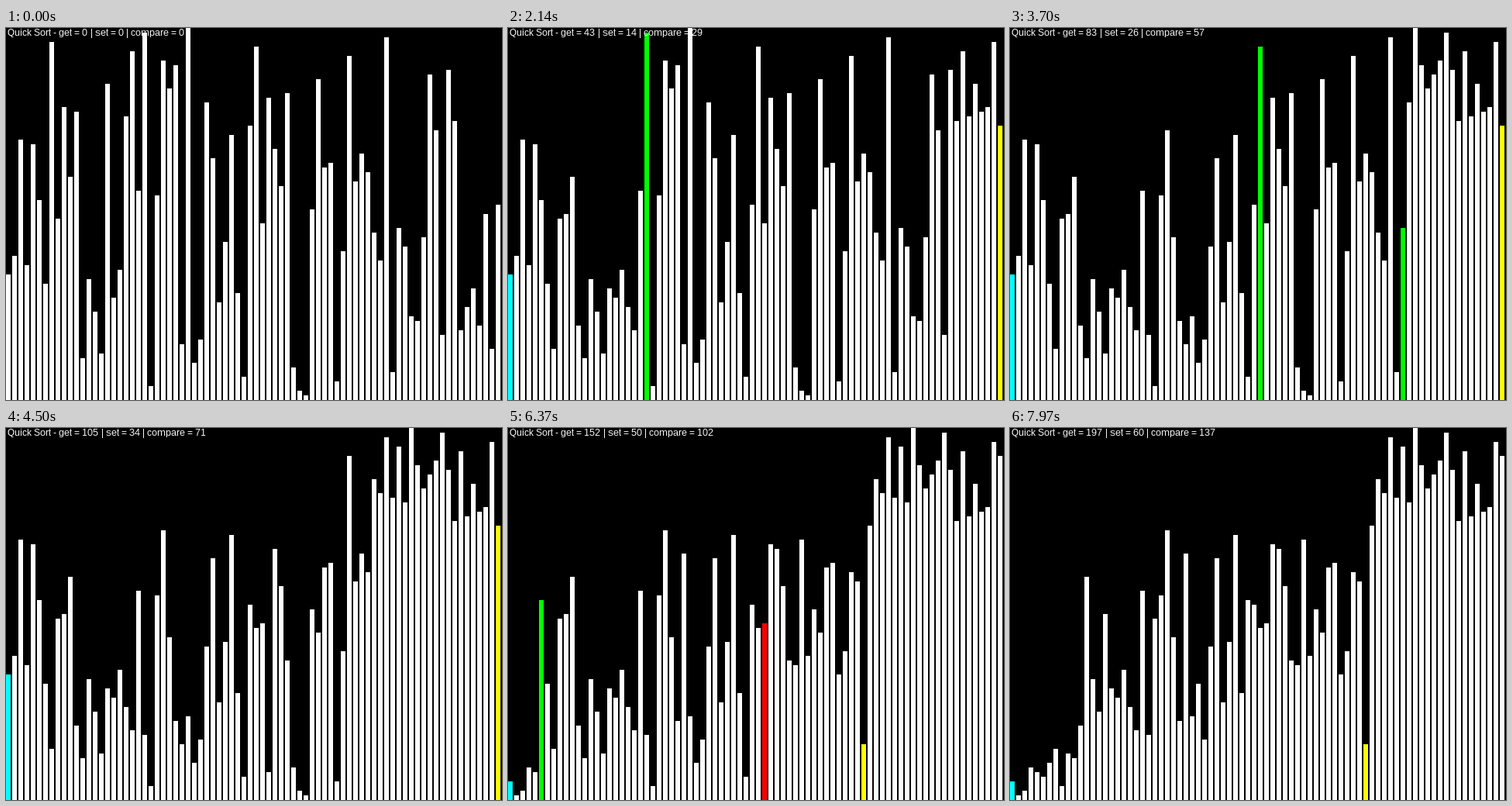
A matplotlib script that plays this animation: 640 px wide and 480 px high, repeating every 8 s.

```python
import matplotlib.pyplot as plt
import numpy as np
from matplotlib.animation import FuncAnimation
from matplotlib.collections import PolyCollection

W, H = 640, 480
PITCH, BAR, UNIT = 8, 6, 6
TICK, LOOP, HOLD = 10, 8000, 500      # ms
RATE = 30                             # sort steps per second
WHITE, RED, GREEN = "#ffffff", "#ff0000", "#00ff00"
CYAN, YELLOW = "#00ffff", "#ffff00"

VALUES = [
    27, 31, 56, 29, 55, 43, 25, 77, 39, 63, 48, 62, 9, 26, 19, 10,
    68, 22, 28, 61, 75, 45, 79, 3, 44, 73, 67, 72, 12, 80, 8, 13,
    64, 52, 21, 34, 57, 23, 5, 59, 76, 38, 65, 54, 46, 66, 7, 2,
    1, 41, 69, 50, 51, 4, 32, 74, 47, 53, 49, 36, 30, 78, 6, 37,
    33, 18, 17, 35, 70, 58, 14, 71, 60, 15, 20, 24, 16, 40, 11, 42,
]


class Sorter:
    """Quick sort that records every visible step."""

    def __init__(self, values):
        self.a = list(values)
        self.gets = self.sets = self.compares = 0
        self.bounds, self.marks = {}, {}
        self.steps = []
        self.record()
        self.sort(0, len(self.a) - 1)

    def record(self):
        colors = [WHITE] * len(self.a)
        for i, color in {**self.bounds, **self.marks}.items():
            colors[i] = color
        counts = (self.gets, self.sets, self.compares)
        self.steps.append((self.a[:], colors, counts))

    def swap(self, i, j):
        self.a[i], self.a[j] = self.a[j], self.a[i]
        self.gets += 2
        self.sets += 2
        self.marks = {}
        self.record()

    def scan(self, i, step, end, passes):
        """Walk a red mark until a value fails the test, then turn it green."""
        while i != end:
            self.marks[i] = RED
            self.record()
            self.gets += 1
            self.compares += 1
            if not passes(self.a[i]):
                self.marks[i] = GREEN
                self.record()
                break
            del self.marks[i]
            i += step
        return i

    def sort(self, lo, hi):
        if lo >= hi:
            return
        self.bounds = {lo: CYAN, hi: YELLOW}
        self.record()
        self.swap((lo + hi) // 2, hi)
        pivot = self.a[hi]
        i, j = lo, hi - 1
        while True:
            i = self.scan(i, 1, hi, lambda v: v < pivot)
            j = self.scan(j, -1, lo - 1, lambda v: v > pivot)
            if i >= j:
                break
            self.swap(i, j)
            i, j = i + 1, j - 1
        self.swap(i, hi)
        self.sort(lo, i - 1)
        self.sort(i + 1, hi)


steps = Sorter(VALUES).steps

plt.rcParams.update({
    "font.family": "Liberation Sans",
    "text.hinting": "native",
    "text.hinting_factor": 1,
})
fig = plt.figure(figsize=(W / 96, H / 96), dpi=96, facecolor="black")
ax = fig.add_axes([0, 0, 1, 1])
ax.set_xlim(0, W)
ax.set_ylim(H, 0)
ax.axis("off")

bars = PolyCollection([], edgecolors="none", linewidths=0, antialiaseds=False)
ax.add_collection(bars, autolim=False)

LABELS = ["Quick Sort - get = ", "| set = ", "| compare = "]
LABEL_X = [2, 109, 155]
DIGIT = 7
texts = [ax.text(x, 10, "", color="white", fontsize=9, va="baseline")
         for x in LABEL_X]


def rect(i, value):
    x, top = i * PITCH, H - value * UNIT
    return [(x, H), (x, top), (x + BAR, top), (x + BAR, H)]


def draw(tick):
    elapsed = tick * TICK - HOLD
    values, colors, counts = steps[max(0, elapsed * RATE // 1000 + 1)]
    bars.set_verts([rect(i, v) for i, v in enumerate(values)])
    bars.set_facecolor(colors)
    shift = 0
    for text, label, x, count in zip(texts, LABELS, LABEL_X, counts):
        text.set_text(f"{label}{count}")
        text.set_x(x + shift)
        shift += DIGIT * (len(str(count)) - 1)
    return [bars, *texts]


anim = FuncAnimation(fig, draw, frames=LOOP // TICK, interval=TICK,
                     init_func=lambda: draw(0), repeat=True, repeat_delay=0,
                     blit=False)
plt.show()
```
